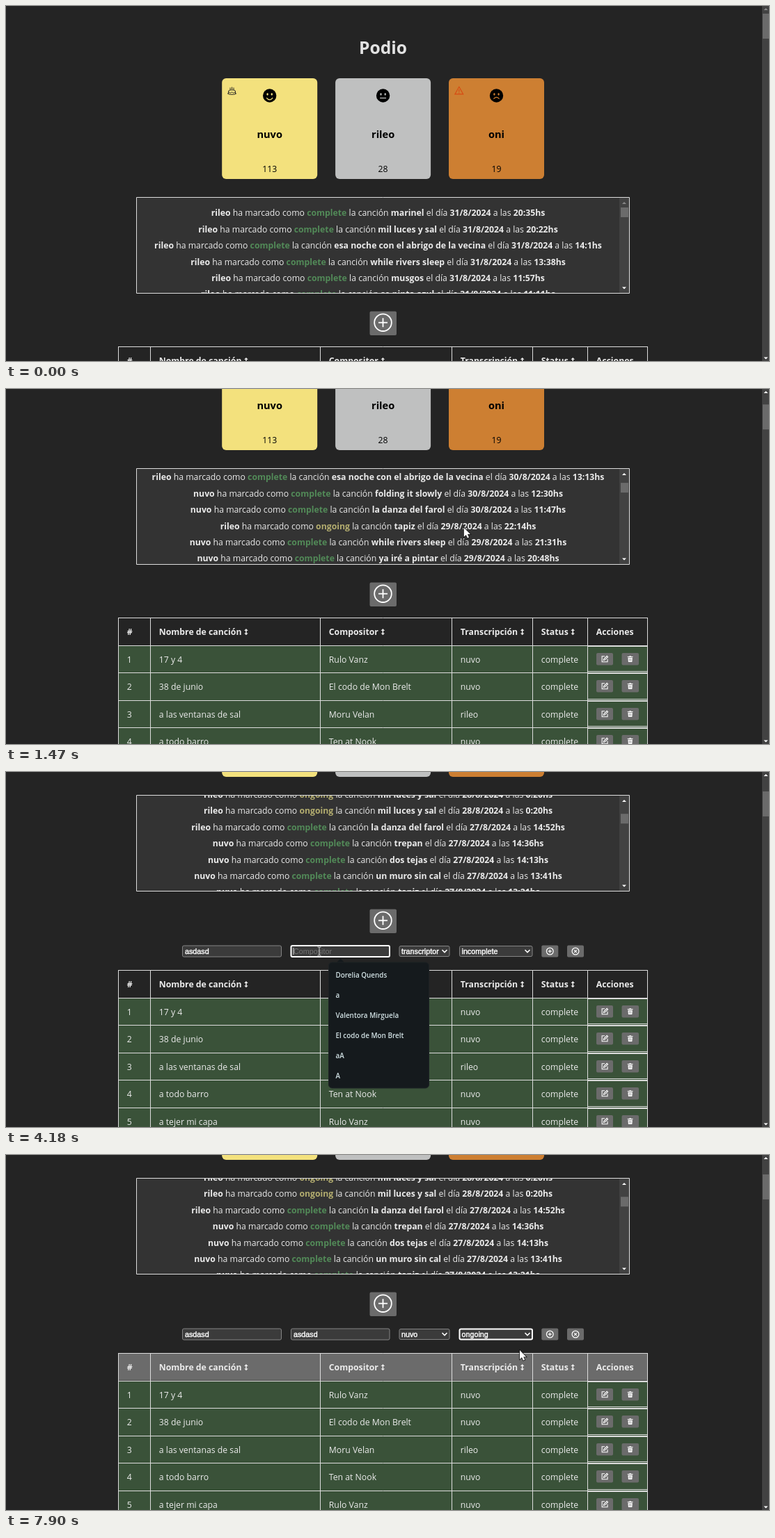
These frames come from a looping animation (1096x511 px, 8000 ms). An HTML page with a canvas:

```html
<!DOCTYPE html>
<html lang="es">
<head>
<meta charset="utf-8">
<title>Podio</title>
<style>
html, body { margin: 0; width: 100%; height: 100%; overflow: hidden; background: #242424; }
canvas { display: block; }
</style>
</head>
<body>
<canvas id="stage" width="1096" height="511"></canvas>
<script>
const c = document.getElementById('stage').getContext('2d');
const UI = '"Open Sans", sans-serif', FORM = '"Liberation Sans", Arial, sans-serif';
const LOOP = 8000, TICK = 80.6, PITCH = 23.4, ROW = 39.6;
const LIGHT = '#ebebeb', GREY = '#6b6b6b';
const STATUS_COLOR = { complete: '#528a58', ongoing: '#b3ad6f' };

const podium = [
  { x: 310.2, color: '#f3e17d', name: 'nuvo', score: 113 },
  { x: 473.1, color: '#bfc0c0', name: 'rileo', score: 28 },
  { x: 636, color: '#cd7f32', name: 'oni', score: 19 }
];

const latest = [
  'rileo,complete,marinel,31/8,20:35', 'rileo,complete,mil luces y sal,31/8,20:22',
  'rileo,complete,esa noche con el abrigo de la vecina,31/8,14:1',
  'rileo,complete,while rivers sleep,31/8,13:38', 'rileo,complete,musgos,31/8,11:57',
  'rileo,complete,se pinta azul,31/8,11:11'
];
const older = [
  'nuvo,ongoing,folding it slowly,29/8,10:16', 'nuvo,ongoing,ya iré a pintar,29/8,10:16',
  'rileo,ongoing,mil luces y sal,28/8,0:20', 'rileo,ongoing,mil luces y sal,28/8,0:20',
  'rileo,complete,la danza del farol,27/8,14:52', 'nuvo,complete,trepan,27/8,14:36',
  'nuvo,complete,dos tejas,27/8,14:13', 'nuvo,complete,un muro sin cal,27/8,13:41',
  'nuvo,complete,tapiz,27/8,13:21'
];
// The entries between both groups reuse their songs with falling times.
const middle = Array.from({ length: 22 }, (_, i) => {
  const [, , song] = [...older, ...latest][(i * 4 + 5) % 15].split(',');
  return [i % 3 ? 'nuvo' : 'rileo', i % 4 ? 'complete' : 'ongoing', song,
    i < 12 ? '30/8' : '29/8', `${22 - i % 12}:${(i * 17) % 50 + 10}`].join();
});
const feed = [...latest, ...middle, ...older].map(s => s.split(','));

const columns = [161, 207, 451, 640, 756, 835, 921];
const headers = ['#', 'Nombre de canción', 'Compositor', 'Transcripción', 'Status', 'Acciones'];
const songs = [
  ['17 y 4', 'Rulo Vanz', 'nuvo'], ['38 de junio', 'El codo de Mon Brelt', 'nuvo'],
  ['a las ventanas de sal', 'Moru Velan', 'rileo'], ['a todo barro', 'Ten at Nook', 'nuvo'],
  ['a tejer mi capa', 'Rulo Vanz', 'nuvo']
];
const composers = ['Dorelia Quends', 'a', 'Valentora Mirguela', 'El codo de Mon Brelt', 'aA', 'A'];
const people = ['Seleccione Transcriptor', 'nuvo', 'rileo', 'oni', 'lumo', 'rafo'];
const statuses = ['Seleccione Status', 'complete', 'incomplete', 'ongoing'];

// time, x, y
const pointer = [
  [90, 760, 170], [890, 670, 196], [1300, 670, 196], [1850, 617, 212], [2120, 542, 297],
  [2790, 542, 297], [3110, 385, 314], [3530, 320, 258], [4010, 320, 258], [4140, 450, 258],
  [4720, 450, 258], [4930, 600, 259], [5010, 600, 259], [5240, 590, 291], [5380, 590, 291],
  [5820, 700, 259], [5900, 700, 259], [6090, 680, 283], [6180, 680, 283], [6420, 680, 292],
  [6750, 680, 292], [7280, 694, 333], [7480, 694, 333], [7880, 738, 281]
];

const icon = {
  edit: new Path2D('M8 2H2V14H14V8M5.5 10.5L6.3 7.6 12.7 1.2 14.8 3.3 8.4 9.7Z'),
  trash: new Path2D('M2 2.5H5.5L6.5 1H9.5L10.5 2.5H14V4H2ZM3 5H13L12.2 15H3.8ZM6 7V13H7V7ZM9 7V13H10V7Z'),
  cake: new Path2D('M2 14V9C2 6.5 14 6.5 14 9V14M2 10C4 13 6 13 8 11 10 13 12 13 14 10M0 13C3 16 13 16 16 13M5 7V3M8 6V2M11 7V3'),
  warning: new Path2D('M8 1.5L15 14H1ZM8 6V10M8 11.2V12.7'),
  arrow: new Path2D('M0 0V13L3 10.2 5 14.8 7.2 13.8 5.2 9.4H9.2Z'),
  hand: new Path2D('M-1.5 1.5C-1.5-.5 1.5-.5 1.5 1.5V6L7 7.3C8.5 7.8 8.5 9 8.3 10.5L7 17H-.5L-5 10.8C-5.5 9.5-3.8 8.6-2.8 9.8L-1.5 11Z'),
  beam: new Path2D('M-2.5-6H-.7L0-5 .7-6H2.5M0-5V5M-2.5 6H-.7L0 5 .7 6H2.5')
};

const ease = (t, from, to) => {
  const u = Math.min(1, Math.max(0, (t - from) / (to - from)));
  return u * u * (3 - 2 * u);
};
const within = (t, a, b) => t >= a && t < b;
const typed = (t, start, step) => 'asdasd'.slice(0, Math.max(0, Math.floor((t - start) / step) + 1));

function pointerAt(t) {
  const i = pointer.findIndex(k => k[0] > t);
  if (i < 0) return pointer.at(-1).slice(1);
  const a = pointer[Math.max(0, i - 1)], b = pointer[i], u = ease(t, a[0], b[0]);
  return [a[1] + (b[1] - a[1]) * u, a[2] + (b[2] - a[2]) * u];
}

function text(s, x, y, { size = 12.25, weight = 400, color = LIGHT, align = 'left', family = UI, heavy } = {}) {
  c.font = `${weight} ${size}px ${family}`;
  c.textAlign = align;
  c.fillStyle = color;
  c.fillText(s, x, y + size * .36);
  if (heavy) {
    c.strokeStyle = color;
    c.lineWidth = .4;
    c.strokeText(s, x, y + size * .36);
  }
  return c.measureText(s).width;
}
const formText = (s, x, y, color = '#fff', heavy = true) =>
  text(s, x, y, { size: 10.75, family: FORM, color, heavy });

function box(x, y, w, h, fill, radius = 0, border, width = 1) {
  c.beginPath();
  c.roundRect(x, y, w, h, radius);
  if (fill) { c.fillStyle = fill; c.fill(); }
  if (border) { c.strokeStyle = border; c.lineWidth = width; c.stroke(); }
}
function line(color, width, ...points) {
  c.beginPath();
  points.forEach(([x, y]) => c.lineTo(x, y));
  c.strokeStyle = color;
  c.lineWidth = width;
  c.stroke();
}
function triangle(x, y, dir, color, r = 3) {
  c.beginPath();
  c.moveTo(x - r, y + dir * r / 2);
  c.lineTo(x + r, y + dir * r / 2);
  c.lineTo(x, y - dir * r / 2);
  c.fillStyle = color;
  c.fill();
}
function glyph(path, x, y, scale, { fill, stroke, width = 1.6 }) {
  c.save();
  c.translate(x, y);
  c.scale(scale, scale);
  if (stroke) { c.strokeStyle = stroke; c.lineWidth = width; c.stroke(path); }
  if (fill) { c.fillStyle = fill; c.fill(path); }
  c.restore();
}
function ringed(x, y, r, arm, width, turn = 0) {
  c.save();
  c.translate(x, y);
  c.beginPath();
  c.arc(0, 0, r, 0, 7);
  c.strokeStyle = '#fff';
  c.lineWidth = width;
  c.stroke();
  c.rotate(turn);
  line('#fff', width, [-arm, 0], [arm, 0]);
  line('#fff', width, [0, -arm], [0, arm]);
  c.restore();
}

function drawPodium(top) {
  text('Podio', 541.5, 60 + top, { size: 24.6, weight: 700, color: '#e2e2e2', align: 'center' });
  podium.forEach(({ x, color, name, score }, i) => {
    const mid = x + 68.5, y = 129 + top;
    box(x, 104 + top, 137, 145, color, 6);
    c.fillStyle = '#000';
    c.beginPath(); c.arc(mid, y, 9.7, 0, 7); c.fill();
    c.fillStyle = color;
    for (const dx of [-3.1, 3.1]) {
      c.beginPath(); c.ellipse(mid + dx, y - 2, 1.2, 1.8, 0, 0, 7); c.fill();
    }
    c.strokeStyle = color;
    c.lineWidth = 1.3;
    c.beginPath();
    if (i == 0) c.arc(mid, y + 1, 4.8, .45, Math.PI - .45);
    else if (i == 1) { c.moveTo(mid - 4.5, y + 3.5); c.lineTo(mid + 4.5, y + 3.5); }
    else c.arc(mid, y + 7, 4.6, Math.PI + .5, -.5);
    c.stroke();
    text(name, mid, 185 + top, { size: 14.6, weight: 700, color: '#000', align: 'center' });
    text(score, mid, 234.5 + top, { color: '#000', align: 'center' });
  });
  glyph(icon.cake, 318, 115 + top, .82, { stroke: '#222', width: 1.2 });
  glyph(icon.warning, 644, 115 + top, .85, { stroke: '#d84a12', width: 1.3 });
}

function drawFeed(top, scroll) {
  const y0 = 275.5 + top;
  box(187.5, y0, 708, 138, '#333', 0, '#ddd');
  c.save();
  c.beginPath();
  c.rect(188, y0 + .5, 707, 137);
  c.clip();
  feed.forEach(([who, status, song, day, hour], i) => {
    const y = y0 + 22.5 + i * PITCH - scroll;
    if (y < y0 - 12 || y > y0 + 150) return;
    const parts = [[who, 700], [' ha marcado como '], [status, 700, STATUS_COLOR[status]], [' la canción '],
      [song, 700], [' el día '], [day + '/2024', 700], [' a las '], [hour + 'hs', 700]];
    const width = parts.reduce((sum, [s, weight = 400]) => {
      c.font = `${weight} 12.25px ${UI}`;
      return sum + c.measureText(s).width;
    }, 0);
    let x = 534.5 - width / 2;
    for (const [s, weight, color] of parts) x += text(s, x, y, { weight, color });
  });
  box(881, y0, 14, 138, '#424242');
  box(883, y0 + 14.5 + scroll * .0168, 11, 14, GREY);
  triangle(888, y0 + 8, 1, scroll > 0 || top < 0 ? '#fff' : '#888');
  triangle(888, y0 + 130.5, -1, '#fff');
  c.restore();
}

function drawTable(y, hover) {
  const h = i => Math.round(y + i * ROW);
  box(161, y, 761, ROW, hover ? GREY : '#242424');
  box(161, h(1), 761, h(6) - h(1), '#3a5239');
  const tx = columns.map(x => x + 12.8);
  headers.forEach((s, i) => {
    const ay = y + 20.7, w = text(s, tx[i], ay, { weight: 700 });
    if (!within(i, 1, 5)) return;
    const ax = tx[i] + w + 6.5;
    line(LIGHT, 1.5, [ax, ay - 3], [ax, ay + 3]);
    triangle(ax, ay - 3.2, 1, LIGHT, 2.8);
    triangle(ax, ay + 3.2, -1, LIGHT, 2.8);
  });
  songs.forEach((song, i) => {
    const top = h(i + 1), mid = top + 20.5;
    [i + 1, ...song, 'complete'].forEach((s, k) => text(s, tx[k], mid));
    box(848, mid - 9.5, 24, 17.5, GREY, 2);
    box(884.5, mid - 9.5, 24.5, 17.5, GREY, 2);
    glyph(icon.edit, 854.8, mid - 6, .66, { stroke: '#fff' });
    glyph(icon.trash, 891.5, mid - 6, .64, { fill: '#fff' });
    box(835.5, top + 1.5, 86, h(i + 2) - top - 3, null, 0, '#ddd');
  });
  for (const x of columns) line('#ddd', 1, [x + .5, y], [x + .5, h(6)]);
  for (let i = 0; i < 6; i++) line('#ddd', 1, [161, h(i) + .5], [922, h(i) + .5]);
}

function field(x, y, w, value, hint, focus) {
  box(x + .5, y - 8, w - 1, 16, '#3b3b3b', 2, focus ? '#fff' : '#858585', focus ? 2 : 1);
  const end = value ? formText(value, x + 4, y) : (formText(hint, x + 4, y, '#757575', false), 0);
  if (focus) line('#ddd', 1, [x + 4 + end, y - 5], [x + 4 + end, y + 5]);
}
function select(x, y, w, value, focus) {
  box(x + .5, y - 7.5, w - 1, 15, '#3b3b3b', 2, focus ? '#fff' : '#858585', focus ? 2 : 1);
  formText(value, x + 3.5, y);
  line('#fff', 1.6, [x + w - 11, y - 2], [x + w - 7.5, y + 1.5], [x + w - 4, y - 2]);
}
function dropdown(x, y, w, items, pointerY, preset) {
  const under = Math.floor((pointerY - y) / 19.6);
  const active = within(under, 1, items.length) ? under : preset;
  box(x + .5, y + .5, w - 1, items.length * 19.6, '#101010', 0, '#888');
  items.forEach((s, i) => {
    const on = i == active;
    if (on) box(x + 1, y + 1 + i * 19.6, w - 2, 19.6, '#99c8ff');
    formText(s, x + 4, y + 10.3 + i * 19.6, on ? '#2b3540' : i ? '#fff' : '#a0a0a0', !on && i > 0);
  });
}
function suggestions(x, y, items) {
  triangle(x + 17, y - 2.5, 1, '#151a1d', 6);
  box(x, y, 144, items.length * 29 + 7, '#151a1d', 5, '#1d2225');
  items.forEach((s, i) => text(s, x + 10, y + 18 + i * 29, { size: 9.9, weight: 600, color: '#d3e3e6' }));
}

function drawPointer(x, y, kind) {
  if (kind == 'beam') {
    glyph(icon.beam, x, y, 1, { stroke: '#ccc', width: 1 });
  } else {
    glyph(icon[kind], x, y, 1, { fill: '#fff', stroke: '#111', width: 1.5 });
  }
}

function draw(t) {
  const page = Math.round(TICK * (ease(t, 100, 400) + ease(t, 430, 740) + ease(t, 2790, 3203)));
  let scroll = ease(t, 1770, 2005);
  for (let i = 0; i < 8; i++) scroll += ease(t, 1190 + i * 48, 1370 + i * 48);
  const open = t >= 2420;
  const formY = 500 - page, tableY = 490 - page + (open ? 37 : 0);
  const [px, py] = pointerAt(t);
  const picking = within(t, 4970, 5300) || within(t, 5880, 7440);
  const hover = !picking && t > 2500 && within(py + 8, tableY, tableY + 47);

  c.fillStyle = '#242424';
  c.fillRect(0, 0, 1096, 511);
  drawPodium(-page);
  drawFeed(-page, scroll * TICK);
  box(522.5, 439.6 - page, 38.5, 34.5, GREY, 2);
  ringed(541.5, 455.7 - page, 12.3, 6.5, 1.8);
  drawTable(tableY, hover);

  if (open) {
    const composer = typed(t, 4400, 60);
    field(253, formY, 143, typed(t, 3710, 50), 'Nombre de canción', within(t, 3650, 4120));
    field(409, formY, 142.5, composer, 'Compositor', within(t, 4120, 4950));
    select(564.5, formY, 73, t < 5300 ? 'transcriptor' : 'nuvo', within(t, 5300, 5870));
    select(651, formY, 105.5, t < 7440 ? 'incomplete' : 'ongoing', t >= 7440);
    for (const [x, turn] of [[781.3, 0], [818, Math.PI / 4]]) {
      box(x - 12, formY - 8.5, 24, 17, GREY, 2);
      ringed(x, formY, 4.9, 2.6, 1.2, turn);
    }
    if (within(t, 3660, 4100)) suggestions(308, 274, ['asdasd']);
    if (within(t, 4140, 4460)) suggestions(463.5, 274, composer ? ['a', 'aA', 'A'] : composers);
    if (within(t, 4970, 5300)) dropdown(564.5, 266, 142, people, py, -1);
    if (within(t, 5880, 7440)) dropdown(651, 266, 105.5, statuses, py, 2);
  }

  box(1086, 0, 10, 511, '#424242');
  box(1087, 11 + page * .07, 9, 36, GREY);
  triangle(1091.5, 4.5, 1, page ? '#fff' : '#888');
  triangle(1091.5, 507, -1, '#fff');

  if (t >= 90) {
    const onButton = Math.abs(px - 541.5) < 20 && Math.abs(py - 457 + page) < 18;
    const onField = open && px < 552 && Math.abs(py - formY) < 9;
    const onHeader = hover && within(py, tableY, tableY + ROW);
    drawPointer(px, py, onButton || onHeader ? 'hand' : onField ? 'beam' : 'arrow');
  }
}

function frame() {
  draw(performance.now() % LOOP);
  requestAnimationFrame(frame);
}
frame();
</script>
</body>
</html>
```
